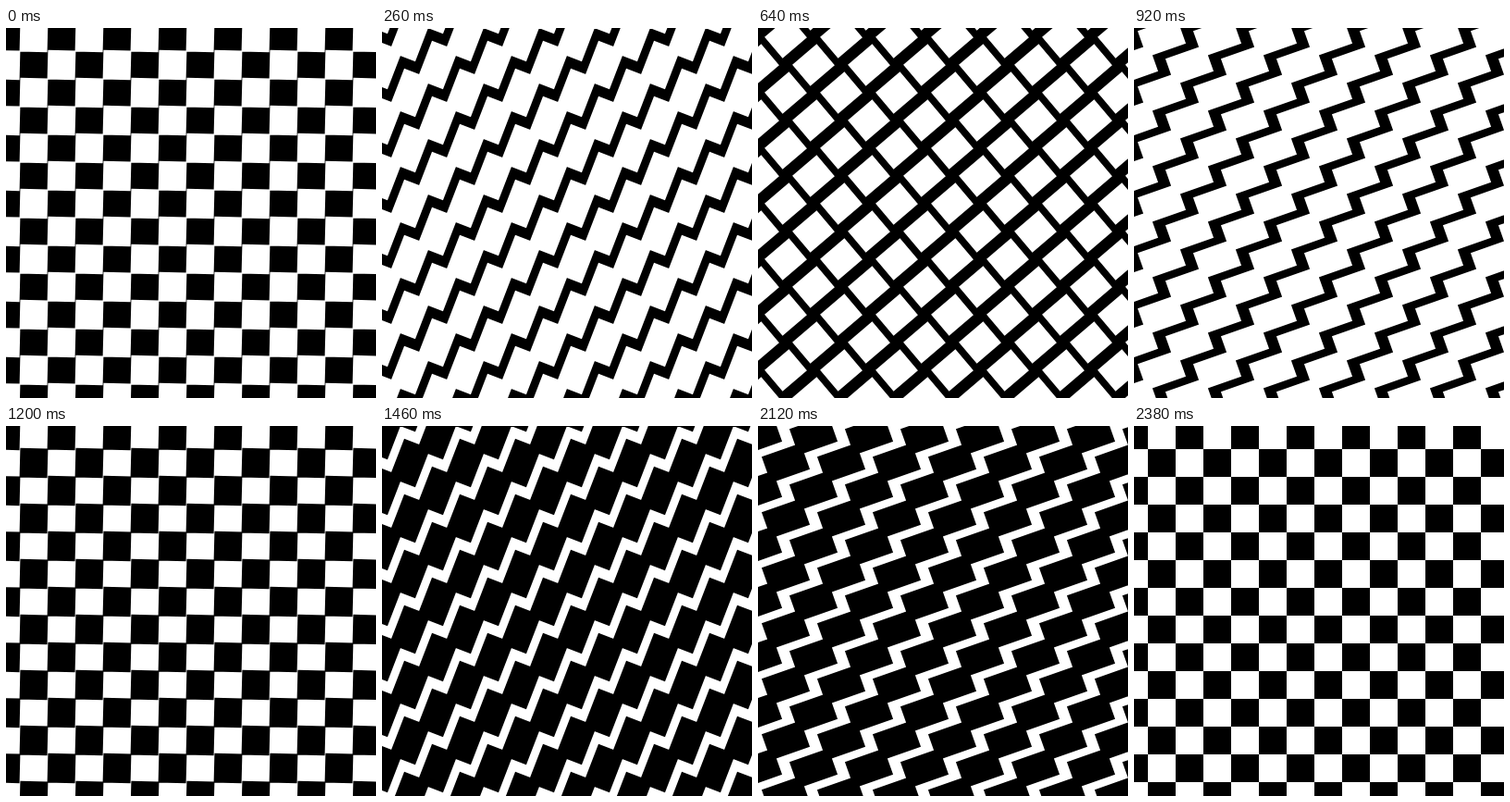
These frames come from a looping animation (400 px wide and 400 px high, 2.4 s). An HTML page with a canvas:

```html
<!DOCTYPE html>
<html lang="en">
<head>
<meta charset="utf-8">
<title>Turning checkerboard</title>
<style>
  html, body { margin: 0; width: 100%; height: 100%; overflow: hidden; background: #fff; }
  canvas { display: block; }
</style>
</head>
<body>
<canvas id="stage" width="400" height="400"></canvas>
<script>
const SIZE = 400, TILE = 30, STEP = 20, STEPS = 60;
const ctx = document.getElementById('stage').getContext('2d');

// One tile centred on (x, y), turned by angle and stretched along its own height
function addTile(x, y, angle, stretch) {
  const c = Math.cos(angle), s = Math.sin(angle);
  const w = TILE / 2, h = w * stretch;
  const corner = (a, b) => [x + a * c - b * s, y + a * s + b * c];
  ctx.moveTo(...corner(-w, -h));
  ctx.lineTo(...corner(w, -h));
  ctx.lineTo(...corner(w, h));
  ctx.lineTo(...corner(-w, h));
  ctx.closePath();
}

function draw(time) {
  const step = Math.floor(time / STEP) % (2 * STEPS);
  const whiteTurns = step < STEPS;
  const q = (step % STEPS + 1) / STEPS;
  const angle = q * Math.PI / 2;
  const stretch = 1 + 0.5 * Math.abs(Math.sin(q * 2 * Math.PI));

  ctx.fillStyle = whiteTurns ? '#000' : '#fff';
  ctx.fillRect(0, 0, SIZE, SIZE);
  ctx.fillStyle = whiteTurns ? '#fff' : '#000';
  ctx.beginPath();
  const parity = whiteTurns ? 1 : 0;
  for (let row = -2; row < 16; row++) {
    for (let col = -2; col < 16; col++) {
      if (((row + col) & 1) === parity) {
        addTile(col * TILE, 10 + row * TILE, angle, stretch);
      }
    }
  }
  ctx.fill();
}

const start = performance.now();
function tick() {
  draw(performance.now() - start);
  requestAnimationFrame(tick);
}
tick();
</script>
</body>
</html>
```
